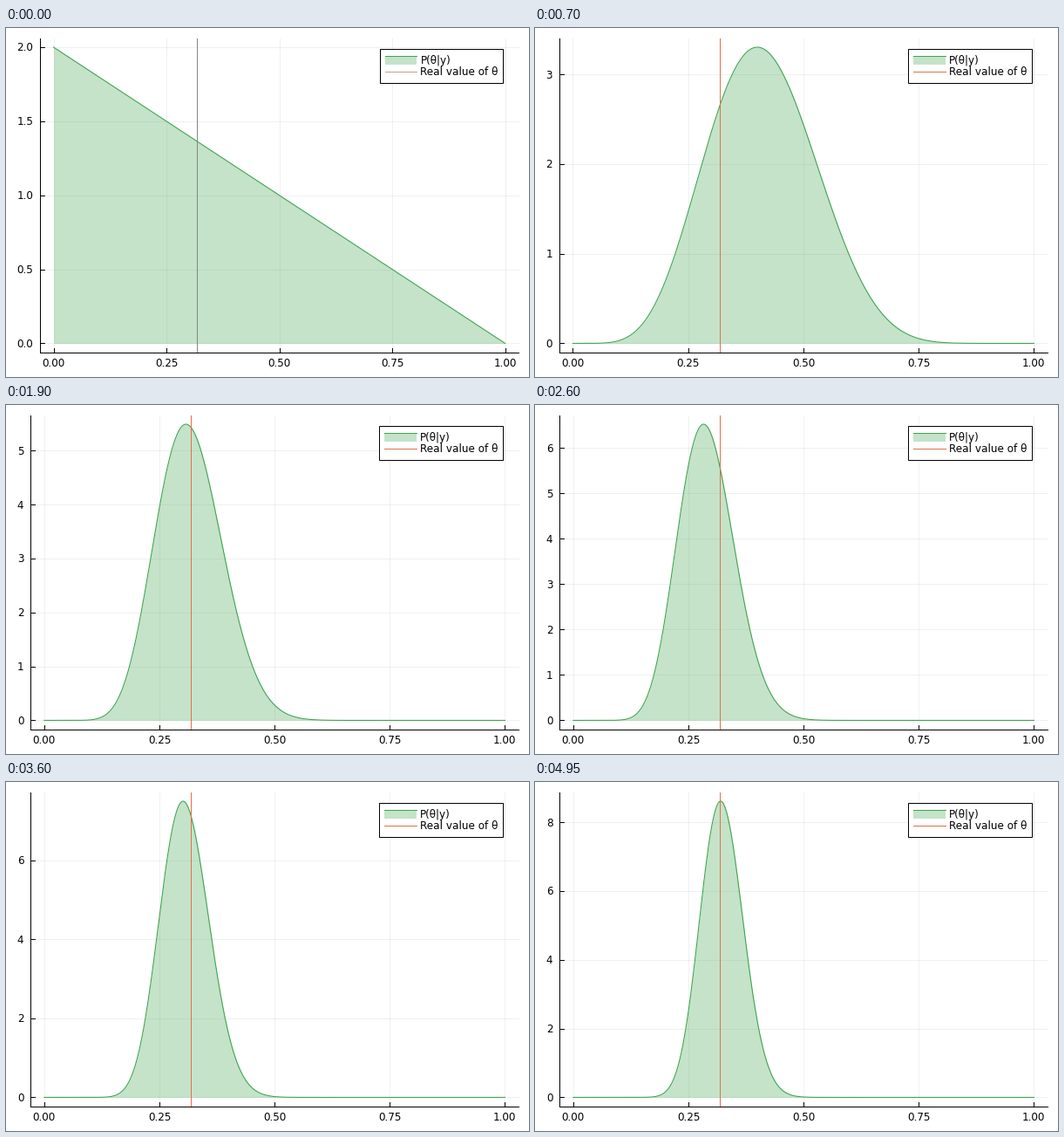
Animation, 600 px wide and 400 px high, one loop 5000 ms. Source, as a matplotlib script:

```python
import math

import matplotlib.pyplot as plt
import numpy as np
from matplotlib.animation import FuncAnimation
from matplotlib.patches import Rectangle

PX = 0.72  # points per pixel at 100 dpi
TOP, BOTTOM, RIGHT = 11.81, 371.65, 588.2
GREEN, ORANGE = "#3ea44e", "#e36f47"
THETA = 1 / math.pi
TRIALS = 100
# trials (counted from 1) that came up as a success
HITS = [3, 5, 8, 12, 13, 15, 18, 21, 25, 29, 33, 38, 42, 47, 51, 58,
        61, 64, 66, 68, 70, 72, 75, 79, 82, 84, 87, 90, 92, 95, 97, 99]

plt.rcParams["font.family"] = "DejaVu Sans"
fig = plt.figure(figsize=(6, 4), dpi=100, facecolor="white")
ax = fig.add_axes([0, 0, 1, 1])
grid = np.linspace(0, 1, 801)


def posterior(n):
    """Beta density after n trials with a flat prior, and its peak."""
    s = sum(h <= n for h in HITS)

    def density(t):
        return (n + 1) * math.comb(n, s) * t**s * (1 - t)**(n - s)

    return density(grid), density(s / n)


def line(x, y, color="black", width=1.0, z=3, **kw):
    ax.plot(x, y, color=color, lw=width * PX, zorder=z, **kw)


def label(x, y, text, align):
    ax.text(x, y + 4.4, text, ha=align, va="baseline", fontsize=12 * PX, zorder=6)


def draw_legend(left, line_color):
    right = RIGHT - (RIGHT - left) / 30
    text_x = right - 94.4
    x1 = text_x - 4
    x0 = x1 - (RIGHT - left) / 15
    ax.add_patch(Rectangle((x0 - 6, 24), right - x0 + 6, 38.6, fc="white",
                           ec="black", lw=PX, zorder=4))
    ax.add_patch(Rectangle((x0, 31.6), x1 - x0, 10.4, fc=GREEN, alpha=0.3,
                           lw=0, zorder=5))
    line([x0, x1], [31.6, 31.6], GREEN, z=5)
    line([x0, x1], [49.8, 49.8], line_color, z=5)
    label(text_x, 36.9, "P(θ|y)", "left")
    label(text_x, 49.8, "Real value of θ", "left")


def draw(i):
    ax.cla()
    ax.axis("off")
    ax.set_xlim(0, 600)
    ax.set_ylim(400, 0)

    dens, peak = posterior(i + 1)
    limit = 1.03 * peak
    step = 0.5 if limit < 3 else 1 if limit < 7 else 2
    left = 39.0 if step < 1 else 27.6 if limit < 4 else 28.0

    def px(t):
        return left + (RIGHT - left) * (t + 0.03) / 1.06

    def py(v):
        return BOTTOM - (BOTTOM - TOP) * (v / peak + 0.03) / 1.06

    for t in (0, 0.25, 0.5, 0.75, 1):
        x = px(t)
        line([x, x], [TOP, BOTTOM], z=1, alpha=0.06)
        line([x, x], [BOTTOM, BOTTOM - 5])
        label(x, 383.1, f"{t:.2f}", "center")
    for k in range(int(limit / step + 1e-9) + 1):
        y = py(k * step)
        line([left, RIGHT], [y, y], z=1, alpha=0.06)
        line([left, left + 5], [y, y])
        label(left - 7.6, y, f"{k * step:.1f}" if step < 1 else str(k * step), "right")

    line([left, left], [TOP, BOTTOM])
    line([left, RIGHT], [BOTTOM, BOTTOM])

    x, y = px(grid), py(dens)
    ax.fill_between(x, y, py(0), color=GREEN, alpha=0.3, lw=0, zorder=2)
    line(x, y, GREEN, 1.1, z=2.5)
    # the marker starts out greyed
    first = i == 0
    xt = px(THETA)
    line([xt, xt], [TOP, BOTTOM], "#838780" if first else ORANGE, z=2.8)
    draw_legend(left, "#cf9a92" if first else ORANGE)
    return []


anim = FuncAnimation(fig, draw, frames=TRIALS, interval=50, repeat=True,
                     repeat_delay=0, init_func=lambda: draw(0), blit=False)
plt.show()
```
